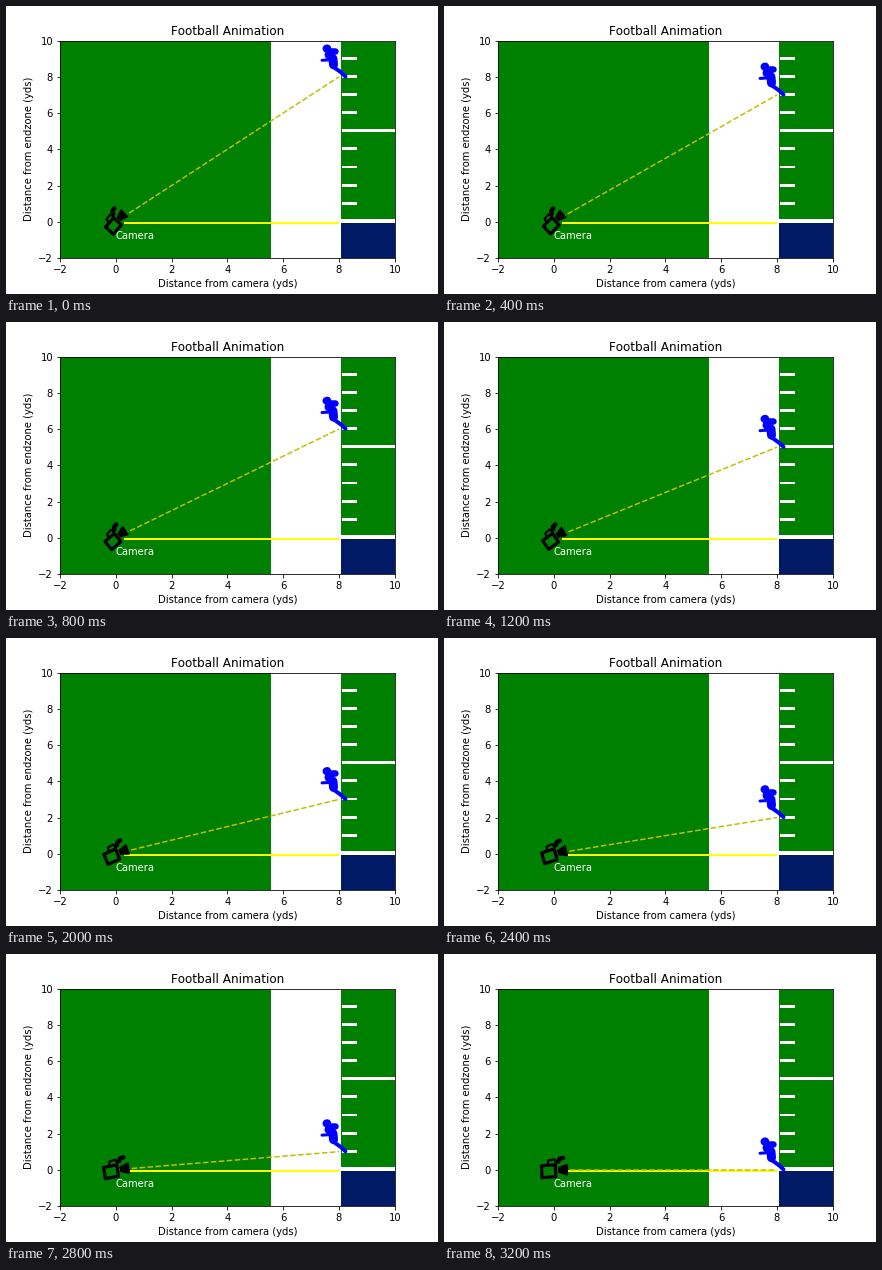
Write a matplotlib script that moves like this. It is 432x288 px and loops after 3600 ms.

```python
import numpy as np
import matplotlib.pyplot as plt
from matplotlib.animation import FuncAnimation
from matplotlib.lines import Line2D
from matplotlib.patches import Polygon, Rectangle
from matplotlib.transforms import Affine2D, ScaledTranslation

plt.rcParams["font.family"] = "DejaVu Sans"
plt.rcParams["text.kerning_factor"] = 6

STEPS = 9
INTERVAL = 400
SIDELINE = 8
FIELD_X = 8.07
BASE = -0.06   # lower edge of every field marking
REACH = 13.3   # half extent of the camera icon, in points

fig = plt.figure(figsize=(6, 4), dpi=72, facecolor="white")
ax = fig.add_axes([0.125, 0.125, 0.775, 0.755])
ax.set(xlim=(-2, 10), ylim=(-2, 10),
       xticks=range(-2, 11, 2), yticks=range(-2, 11, 2),
       xlabel="Distance from camera (yds)",
       ylabel="Distance from endzone (yds)")
ax.set_title("Football Animation")


def box(x0, y0, x1, y1, color):
    ax.add_patch(Rectangle((x0, y0), x1 - x0, y1 - y0, fc=color, lw=0))


def around(x, y):
    """Transform for offsets in points from a data position."""
    return (Affine2D().scale(1 / 72) + fig.dpi_scale_trans
            + ScaledTranslation(x, y, ax.transData))


def shape(points, lw, face, color="black"):
    return ax.add_artist(Polygon(points, fc=face, ec=color, lw=lw,
                                 joinstyle="round", zorder=5))


def stroke(points, lw, color="black"):
    x, y = np.transpose(points)
    return ax.add_artist(Line2D(x, y, color=color, lw=lw, zorder=5,
                                solid_capstyle="round",
                                solid_joinstyle="round"))


# Field
box(-2, -2, 5.56, 10, "green")
box(FIELD_X, BASE, 10, 10 + BASE, "green")
box(FIELD_X, -2, 10, BASE, "#001a66")
box(FIELD_X, BASE, 10, 0.16, "white")
for yard in range(1, 10):
    box(8.1, yard + BASE, 10 if yard == 5 else 8.64, yard + 0.102, "white")

ax.plot([0.3, SIDELINE], [BASE, BASE], color="yellow", lw=2,
        solid_capstyle="butt")
sight, = ax.plot([], [], "y--", lw=1.5, zorder=3)
ax.text(0, -0.95, "Camera", color="white")

# Camera
body = np.array([(-12.5, 4), (1.5, 5), (2, -7), (-12, -8)])
lens = np.array([(5, 2), (13.5, 5), (13.5, -5), (5, -2)])
handle = np.array([(-6.5, 5), (-5.5, 9.5), (1, 10.5), (2.5, 6)])
reel = np.array([(4.5, 8.5), (6, 11.3), (9.5, 12)])
camera = [
    (body, shape(body, 3.2, "green")),
    (lens, shape(lens, 2, "black")),
    (handle, stroke(handle, 2.2)),
    (reel, stroke(reel, 4.5)),
]
outline = np.vstack([points for points, _ in camera])
for _, part in camera:
    part.set_transform(around(0, 0))

# Runner: head, shoulders, torso, arm, leg
runner = [
    stroke([(-12.5, 28.2), (-11.8, 28.4)], 8, "blue"),
    stroke([(-8, 26), (-4.5, 26)], 6.5, "blue"),
    stroke([(-10, 22), (-6, 18), (-5.5, 12)], 9, "blue"),
    stroke([(-17, 16.5), (-9, 17)], 3, "blue"),
    stroke([(-5, 9.5), (2, 4.5), (6.5, 0.3)], 4, "blue"),
]


def update(i):
    y = STEPS - 1 - i
    sight.set_data([0, SIDELINE], [0, y])
    for limb in runner:
        limb.set_transform(around(SIDELINE, y))

    # The icon is refitted to the same square after each turn.
    turn = Affine2D().rotate(np.arctan2(y, SIDELINE))
    fit = REACH / np.abs(turn.transform(outline)).max()
    for points, part in camera:
        turned = turn.transform(points) * fit
        if isinstance(part, Polygon):
            part.set_xy(turned)
        else:
            part.set_data(*turned.T)


anim = FuncAnimation(fig, update, frames=STEPS, interval=INTERVAL,
                     init_func=lambda: update(0), repeat=True,
                     repeat_delay=0, blit=False)
plt.show()
```
